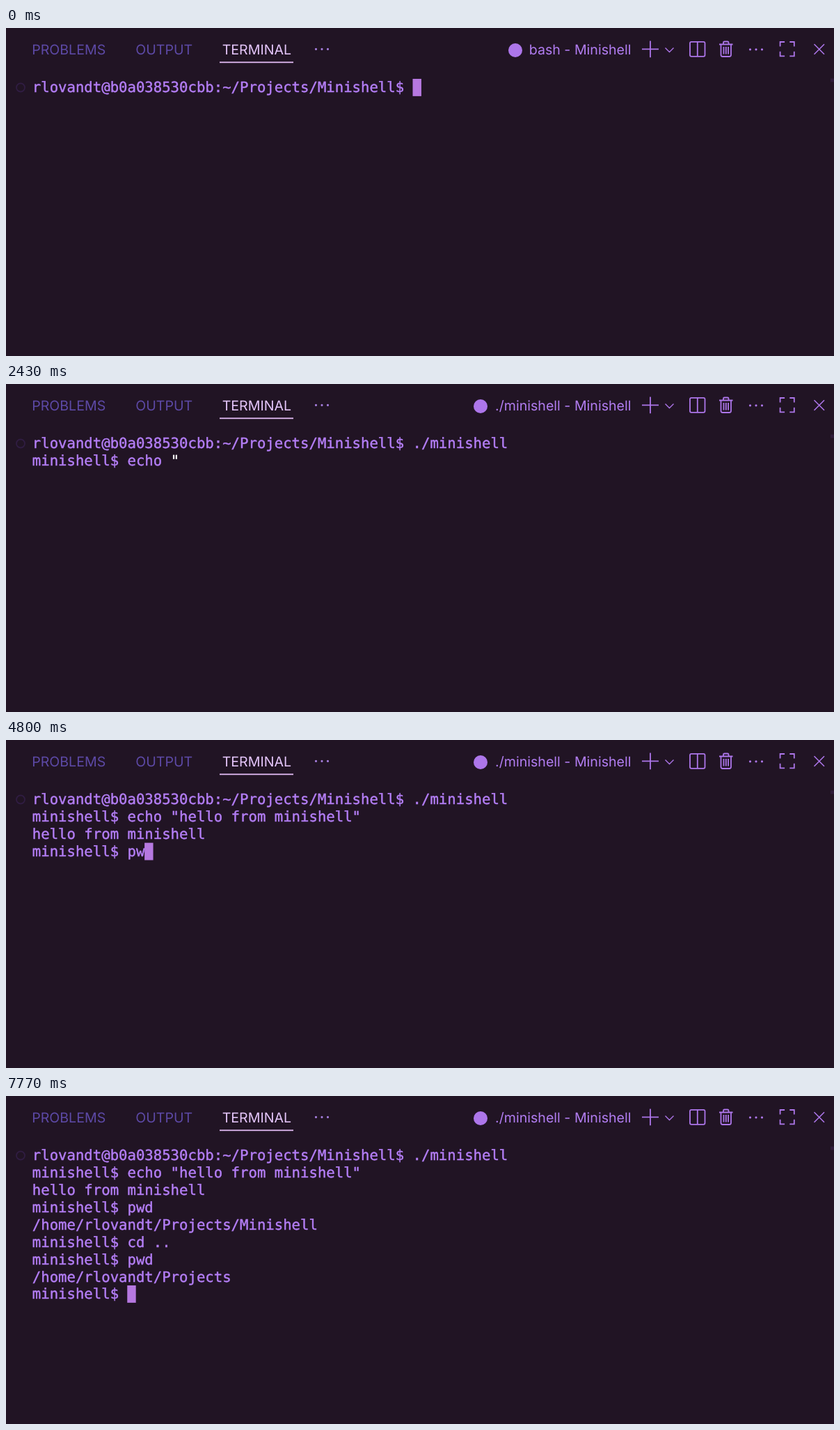
An HTML page that plays this animation: 1190x471 px, repeating every 8000 ms.

```html
<!DOCTYPE html>
<html lang="en">
<head>
<meta charset="utf-8">
<title>Terminal session</title>
<style>
  html, body { margin: 0; width: 100%; height: 100%; overflow: hidden; background: #211424; }
  svg { display: block; width: 1190px; height: 471px; }
  text { white-space: pre; text-rendering: geometricPrecision; }
  .ui { font: 19.6px Inter, Roboto, sans-serif; }
  .mono {
    font: 20.65px "DejaVu Sans Mono", "Liberation Mono", monospace;
    fill: #b47ef6; stroke: #b47ef6; stroke-width: 0.45;
  }
  #mark { fill: #fff; stroke: #fff; }
  .icon { fill: none; stroke: #ad76ea; stroke-width: 1.8; }
  .dots { fill: none; stroke-width: 3.2; stroke-linecap: round; }
</style>
</head>
<body>
<svg viewBox="0 0 1190 471">
  <rect width="1190" height="471" fill="#211424"/>

  <g class="ui" fill="#5d49a6">
    <text x="37.2" y="37.6">PROBLEMS</text>
    <text x="186.2" y="37.6">OUTPUT</text>
    <text x="310.7" y="37.6" fill="#e5c6fb">TERMINAL</text>
  </g>
  <rect x="307" y="48.4" width="106" height="1.8" fill="#e0b9f2"/>
  <path class="dots" stroke="#a77fe0" d="M445.5 30.3h0m8.5 0h0m8.5 0h0"/>

  <circle id="badge" cx="732" cy="32" r="10" fill="#ad76ea"/>
  <text id="title" class="ui" x="898.5" y="38.3" text-anchor="end" fill="#b27df2"></text>

  <g class="icon">
    <path d="M914 30.4h24M926 18.6v23.6"/>
    <path d="M947.5 28.5l6 6 6-6" stroke-width="1.4"/>
    <rect x="983" y="19.8" width="21.5" height="21" rx="2"/>
    <path d="M993.8 20v21"/>
    <path d="M1025 23.5h19.5M1031 23.5V21q0-1.5 1.5-1.5h4.500q1.500 0 1.500 1.500v2.500M1027.500 23.500v15q0 2.500 2.500 2.500h9.500q2.500 0 2.500-2.500v-15"/>
    <path d="M1031.500 27v10.500m3.300-10.500v10.500m3.300-10.500v10.500"/>
    <path class="dots" d="M1069.500 30.800h0m8.500 0h0m8.500 0h0"/>
    <path d="M1112.600 26.500V20h6.500M1126.300 20h6.500v6.500M1132.800 33.800v6.500h-6.500M1119.100 40.300h-6.500v-6.500"/>
    <path d="M1161.500 23.300l14.500 14.500m0-14.500l-14.500 14.500" stroke-width="1.600"/>
  </g>

  <circle cx="21" cy="85.500" r="6" fill="none" stroke="#301d42" stroke-width="1.800"/>
  <rect x="1185" y="72.500" width="5" height="5" fill="#2e1c39"/>

  <rect id="cursor" fill="#b678e0"/>
  <g id="rows"></g>
  <text id="mark" class="mono"></text>
</svg>
<script>
const LOOP = 8000, LEFT = 37.5, TOP = 73, CELL = 12.432, LINE = 24.875, ROWS = 9;
const USER = 'rlovandt';
const PROMPT = 'minishell$ ';
const TITLE_AT = 1330;
const QUOTES = [[2430, 2470], [4070, 4270]]; // quote still being composed
const $ = id => document.getElementById(id);
const events = [];

const put = (time, text) => events.push([time, text]);

// Screen refreshes come 30 times a second, stamped to 10 ms.
const snap = t => Math.round(Math.round(t * 0.03) * 10 / 3) * 10;

function type(text, from, to) {
  const step = (to - from) / Math.max(1, text.length - 1);
  [...text].forEach((ch, i) => put(snap(from + i * step), ch));
}

put(0, USER + '@b0a038530cbb:~/Projects/Minishell$ ');
type('./', 30, 70);
put(630, 'm');
type('in', 770, 800);
put(870, 'ishell ');
put(1230, '\n' + PROMPT);
type('echo ', 1830, 2170);
put(2430, '"');
type('hello ', 2470, 2800);
type('from minishell', 3130, 3900);
put(4070, '"');
put(4270, '\nhello from minishell\n' + PROMPT);
type('pw', 4670, 4800);
put(5000, 'd');
put(5500, '\n/home/' + USER + '/Projects/Minishell\n' + PROMPT);
type('cd ', 5900, 6070);
type('..', 6330, 6400);
put(6730, '\n' + PROMPT);
put(7170, 'p');
type('wd', 7400, 7470);
put(7700, '\n/home/' + USER + '/Projects\n' + PROMPT);

const colX = col => LEFT + col * CELL;
const rowY = row => TOP + row * LINE;
const textX = col => colX(col) + 0.3;
const baseline = row => rowY(row) + 19.4;

function set(el, attrs) {
  for (const key in attrs) el.setAttribute(key, attrs[key]);
}

const rows = Array.from({ length: ROWS }, (_, i) => {
  const el = document.createElementNS('http://www.w3.org/2000/svg', 'text');
  set(el, { class: 'mono', x: textX(0), y: baseline(i) });
  return $('rows').appendChild(el);
});

function draw(t) {
  const lines = events.filter(e => e[0] <= t).map(e => e[1]).join('').split('\n');
  const last = lines.length - 1;
  const end = lines[last].length;
  const composing = QUOTES.some(([a, b]) => t >= a && t < b);

  if (composing) lines[last] = lines[last].slice(0, -1);
  rows.forEach((el, i) => { el.textContent = lines[i] || ''; });

  $('mark').textContent = composing ? '"' : '';
  set($('mark'), { x: textX(end - 1), y: baseline(last) });
  set($('cursor'), {
    x: colX(end), y: rowY(last), width: CELL, height: LINE,
    visibility: composing ? 'hidden' : 'visible'
  });

  const running = t >= TITLE_AT;
  $('title').textContent = (running ? './minishell' : 'bash') + ' - Minishell';
  set($('badge'), { cx: running ? 682 : 732 });
}

const start = performance.now();
function tick() {
  draw((performance.now() - start) % LOOP);
  requestAnimationFrame(tick);
}
tick();
</script>
</body>
</html>
```
